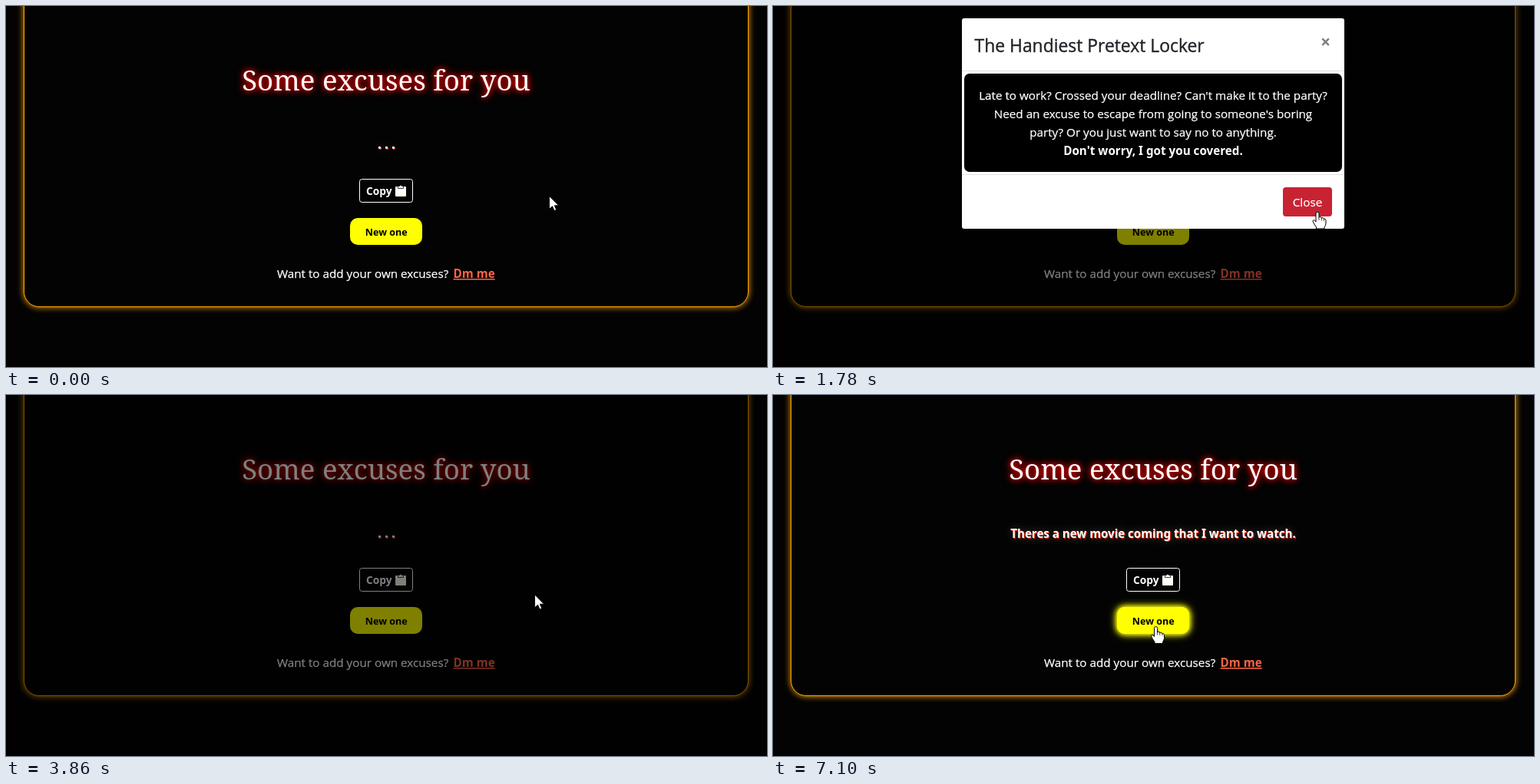
An HTML page for the animation above (8 s loop, 991 by 470 pixels).

```html
<!DOCTYPE html>
<html lang="en">
<head>
<meta charset="utf-8">
<title>Excuses</title>
<style>
  html, body { margin: 0; width: 100%; height: 100%; overflow: hidden; background: #030303; }
  svg { display: block; position: absolute; left: 0; top: 0; }
  text { font: 15.24px "Open Sans", "Noto Sans", sans-serif; fill: #fff; stroke: #fff; stroke-width: .25; }
  .mid { text-anchor: middle; }
  .bold { font-family: "Noto Sans", "Open Sans", sans-serif; font-weight: 700; stroke: none; }
  #panel { fill: #030303; stroke: #ffa500; filter: drop-shadow(0 0 4px #ffa500); }
  #heading { font: 36.65px "Noto Serif", serif; stroke: none; filter: drop-shadow(0 0 3px #d00000) drop-shadow(0 0 4px #b00000); }
  #excuse { font-size: 15.1px; filter: drop-shadow(1px 1px 0 #f20) drop-shadow(0 0 6px rgba(255,255,255,.2)); }
  #excuse.dots { font-size: 19px; letter-spacing: 3.6px; }
  #copy { font-size: 13.8px; }
  #fresh { font-size: 12.6px; fill: #000; }
  #glow { filter: drop-shadow(0 0 3px #ff0) drop-shadow(0 0 5px #ff0); }
  #glow, #button { fill: #ff0; }
  #link { fill: #ff6347; text-decoration: underline; }
  #title { font-size: 22.9px; font-weight: 500; fill: #212529; stroke: #212529; stroke-width: .4; }
  #cross { font-size: 23px; fill: #7d7f7c; }
  #hint { font-size: 13.3px; }
  #arrow, #hand { fill: #fff; stroke: #000; stroke-linejoin: round; }
</style>
</head>
<body>
<svg width="991" height="470" viewBox="0 0 991 470">
  <rect id="panel" x="23.5" y="-60.5" width="943" height="452" rx="19.5"/>
  <text id="heading" class="mid" x="495" y="110">Some excuses for you</text>
  <text id="excuse" class="bold" y="186"></text>

  <rect x="460.5" y="225.5" width="69" height="30" rx="3" fill="none" stroke="#fff"/>
  <text id="copy" class="bold" x="469" y="246">Copy</text>
  <rect x="507" y="235" width="14" height="13" rx="1" fill="#fffdf4"/>
  <path d="M510.5 237.5v-3h2q1.5-2.5 3 0h2v3z" fill="#fffdf4" stroke="#111" stroke-width=".8"/>

  <rect id="glow" x="448" y="276" width="94" height="35" rx="10"/>
  <rect id="button" x="448" y="276" width="94" height="35" rx="10"/>
  <text id="fresh" class="bold mid" x="495.3" y="299">New one</text>

  <text x="353" y="354">Want to add your own excuses?</text>
  <text id="link" class="bold" x="582.5" y="354">Dm me</text>

  <rect id="shade" width="991" height="470"/>

  <g id="modal">
    <rect x="246" y="16" width="498" height="274" rx="3" fill="#fff"/>
    <path d="M246 84.5H744M246 219.5H744" stroke="#dee2e6"/>
    <text id="title" x="262.5" y="60">The Handiest Pretext Locker</text>
    <text id="cross" class="bold mid" x="719.5" y="55">×</text>
    <rect x="249" y="88" width="492" height="128" rx="7"/>
    <text class="mid" x="495" y="122">Late to work? Crossed your deadline? Can't make it to the party?</text>
    <text class="mid" x="495" y="146">Need an excuse to escape from going to someone's boring</text>
    <text class="mid" x="495" y="170">party? Or you just want to say no to anything.</text>
    <text class="bold mid" x="495" y="194">Don't worry, I got you covered.</text>
    <rect id="ring" x="662.4" y="234.4" width="67.2" height="41.2" rx="5.5" fill="none" stroke="#e15361" stroke-opacity=".5" stroke-width="3.2"/>
    <rect id="close" x="664" y="236" width="64" height="38" rx="4"/>
    <text class="mid" x="696" y="261">Close</text>
  </g>

  <g id="tip">
    <rect x="571" y="365" width="76" height="28" rx="4" fill-opacity=".9"/>
    <text id="hint" class="mid" x="609" y="384">Click here</text>
  </g>

  <g id="cursor">
    <path id="arrow" stroke-width=".9" d="M-.5-.5V16.3L3.5 12.8 6 18.5 8.7 17.4 6.3 11.8H11.6z"/>
    <g id="hand">
      <path d="M-2 2Q-2 0 0 0Q2 0 2 2V7.5q0-1 1.5-1q1.8 0 1.8 2q.3-1 1.6-.8q1.6.2 1.6 2q.4-.8 1.2-.6q1.3.3 1.3 2V15q0 2.5-2 5V22H-1.5V20Q-4.5 16-6 12.5Q-6 10.5-4.5 10.7Q-3 11-2 13z"/>
      <path d="M2 7.5v3.5M5.3 8.5v3M8.5 9.7v2.3" stroke-width=".7" fill="none"/>
    </g>
  </g>
</svg>
<script>
  const LOOP = 8000;
  const $ = id => document.getElementById(id);
  const ramp = (t, from, span) => Math.min(1, Math.max(0, (t - from) / span));
  const easeOut = x => 1 - Math.pow(1 - x, 1.65);
  const within = (t, from, to) => t >= from && t < to;
  const show = (id, on) => $(id).setAttribute("visibility", on ? "inherit" : "hidden");
  const fade = (id, value) => $(id).setAttribute("opacity", value);

  // pointer stops: time, x, y
  const stops = [
    [0, 708, 248], [1560, 708, 248], [1780, 709, 268], [1910, 709, 268],
    [2190, 705, 259], [2310, 705, 259], [2670, 693, 254], [3800, 693, 254],
    [4000, 680, 275], [4200, 640, 325], [4330, 600, 347], [4420, 550, 352],
    [4510, 519, 349], [4640, 507, 337], [4780, 500, 312], [4880, 498.5, 301.5],
    [LOOP, 498.5, 301.5]
  ];

  function pointer(t) {
    const i = stops.findIndex(s => s[0] > t);
    const [t0, x0, y0] = stops[i - 1], [t1, x1, y1] = stops[i];
    const k = (t - t0) / (t1 - t0);
    return [x0 + (x1 - x0) * k, y0 + (y1 - y0) * k];
  }

  // the dialog opens in a few coarse steps
  const ticks = [0, 300, 440, 570, 670, 770];
  const snap = t => t >= 770 ? t : ticks.filter(s => s <= t).pop();

  function setExcuse(t) {
    const el = $("excuse"), dots = t < 5600;
    const line = dots ? "..." : t < 7100 ? "I feel so sick." : "Theres a new movie coming that I want to watch.";
    if (el.textContent === line) return;
    el.textContent = line;
    el.setAttribute("class", dots ? "bold dots" : "bold mid");
    el.setAttribute("x", dots ? 483.8 : 495);
  }

  function draw(time) {
    const t = snap(time);
    const opening = t < 3000;
    const start = opening ? 420 : 3697;
    const slide = easeOut(ramp(t, start, 300));
    const seen = ramp(t, start, 150);
    const lift = Math.round(50 * (opening ? 1 - slide : slide));

    fade("shade", 0.5 * (ramp(t, 210, 150) - ramp(t, 4000, 150)));
    fade("modal", opening ? seen : 1 - seen);
    $("modal").setAttribute("transform", `translate(0 ${-lift})`);
    $("close").setAttribute("fill", t < 1580 ? "#dc3545" : t < 3640 ? "#c82333" : "#bd2130");
    show("ring", t >= 3640);

    fade("tip", ramp(t, 4270, 100) - ramp(t, 4380, 150));
    fade("glow", ramp(t, 4720, 130));
    setExcuse(t);

    const hand = within(t, 1580, 3800) || within(t, 4270, 4380) || t >= 4760;
    const [x, y] = pointer(t);
    show("hand", hand);
    show("arrow", !hand);
    $("cursor").setAttribute("transform", `translate(${x} ${y})`);
  }

  function frame(now) {
    draw(now % LOOP);
    requestAnimationFrame(frame);
  }
  draw(0);
  requestAnimationFrame(frame);
</script>
</body>
</html>
```
